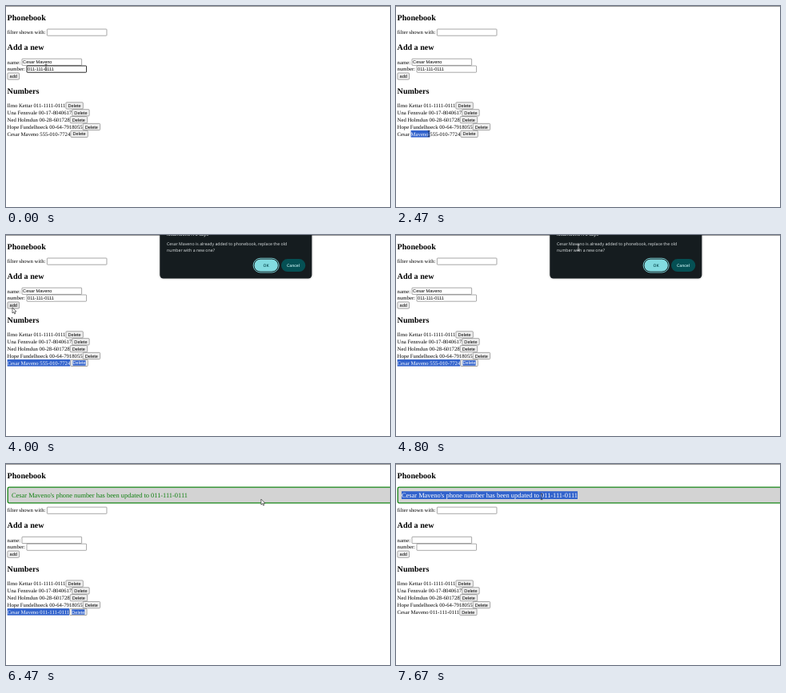
An HTML page with a canvas for the animation above (8000 ms loop, 480 by 252 pixels).

```html
<!DOCTYPE html>
<html lang="en">
<head>
<meta charset="utf-8">
<title>Phonebook</title>
<style>
  html, body { margin: 0; width: 100%; height: 100%; overflow: hidden; background: #fff; }
  canvas { display: block; width: 480px; height: 252px; }
</style>
</head>
<body>
<canvas id="stage" width="480" height="252"></canvas>
<script>
const ctx = document.getElementById('stage').getContext('2d');
const LOOP = 8000, STEP = 1000 / 15;
const SERIF = '"Liberation Serif", "Times New Roman", serif';
const SANS = '"Liberation Sans", Arial, sans-serif';
const UI = '"Open Sans", "Noto Sans", sans-serif';
const BODY = `6.72px ${SERIF}`, HEAD = `bold 10.08px ${SERIF}`, FORM = `5.6px ${SANS}`;
const BLUE = '#3263cc', ROW_H = 8.85, NOTICE_H = 25.1;

const NAME = 'Cesar Maveno', OLD = '555-010-7724', NEW = '011-111-0111';
const PEOPLE = [
  'Ilmo Kettar 011-1111-0111',
  'Una Fennvale 00-17-8040617',
  'Ned Holmdun 00-28-601728',
  'Hope Fundelhoeck 00-64-7918055'
];

// Moments when something changes at once
const AT = {
  blur: 665, word: 725, line: 2600, dialog: 3793, drag: 4865, ring: 5400,
  accept: 6265, update: 6330, clear: 6995, notice: 7525
};

// Pointer path: time, x, y, shape (I = text beam, A = arrow)
const PATH = [
  [0, 50, 77, 'I'], [70, 50, 77, 'I'], [270, 106, 122, 'A'], [470, 33, 160, 'I'],
  [870, 33, 160, 'I'], [1200, 48, 71, 'I'], [1470, 98, 79, 'I'], [1730, 78, 79, 'I'],
  [2270, 41, 160, 'I'], [2930, 41, 160, 'I'], [3330, 72, 79, 'I'], [3670, 8, 91, 'A'],
  [4130, 8, 91, 'A'], [4670, 228, 16, 'I'], [4800, 228, 16, 'I'], [4870, 213, 12, 'I'],
  [5000, 330, 12, 'I'], [5130, 251, 20, 'I'], [5330, 251, 20, 'I'], [5730, 272, 36, 'A'],
  [5870, 272, 36, 'A'], [6130, 325, 38, 'A'], [6330, 325, 38, 'A'], [6530, 317, 46, 'A'],
  [6600, 317, 46, 'A'], [6670, 205, 70, 'A'], [6930, 45, 184, 'I'], [7000, 45, 184, 'I'],
  [7330, 185, 40, 'I'], [7600, 185, 40, 'I'], [7670, 182, 41, 'I'], [LOOP, 182, 41, 'I']
];

const clamp = v => Math.max(0, Math.min(1, v));
const ease = v => v * v * (3 - 2 * v);

function pointer(t) {
  const i = Math.max(1, PATH.findIndex(p => p[0] > t));
  const a = PATH[i - 1], b = PATH[i];
  const k = ease(clamp((t - a[0]) / (b[0] - a[0])));
  return {
    x: a[1] + (b[1] - a[1]) * k,
    y: a[2] + (b[2] - a[2]) * k,
    shape: k > 0.6 ? b[3] : a[3]
  };
}

function text(str, x, y, font, color = '#000', align = 'left') {
  ctx.font = font;
  ctx.fillStyle = color;
  ctx.textAlign = align;
  ctx.fillText(str, x, y);
}

function width(str, font) {
  ctx.font = font;
  return ctx.measureText(str).width;
}

function rect(x, y, w, h, color) {
  ctx.fillStyle = color;
  ctx.fillRect(x, y, w, h);
}

function box(x, y, w, h, r, fill, stroke, line = 0.5) {
  ctx.beginPath();
  ctx.roundRect(x, y, w, h, r);
  if (fill) { ctx.fillStyle = fill; ctx.fill(); }
  if (stroke) { ctx.strokeStyle = stroke; ctx.lineWidth = line; ctx.stroke(); }
}

function field(label, y, value, focused) {
  text(label, 1.6, y, BODY);
  const x = 1.6 + width(label + ' ', BODY);
  box(x + 0.3, y - 6.3, 74.6, 8.2, 0.7, '#fff', focused ? '#101010' : '#6c6c6c', focused ? 0.9 : 0.6);
  text(value, x + 1.4, y - 0.2, FORM);
}

function button(label, x, y, { hover, selected } = {}) {
  const tw = width(label, FORM), w = tw + 5.9;
  box(x + 0.3, y - 6.4, w - 0.6, 8.3, 1.1, hover ? '#e2e2e2' : '#efefef', '#6f6f6f', 0.6);
  if (selected) rect(x + 2.9, y - 5.4, tw, 6.5, BLUE);
  text(label, x + 2.95, y - 0.2, FORM, selected ? '#fff' : '#000');
}

// sel: 'none', 'word' or 'line'
function person(entry, y, sel = 'none') {
  const w = width(entry, BODY), x = 1.6;
  text(entry, x, y, BODY);
  if (sel !== 'none') {
    const [first, last] = entry.split(' ');
    const from = sel === 'word' ? width(first + ' ', BODY) : 0;
    const to = sel === 'word' ? width(`${first} ${last} `, BODY) : w;
    const part = sel === 'word' ? last : entry;
    rect(x + from, y - 6.6, to - from, 8.6, BLUE);
    text(part, x + from, y, BODY, '#fff');
  }
  button('Delete', x + w + 0.2, y, { selected: sel === 'line' });
}

function notice(selected) {
  const msg = `${NAME}'s phone number has been updated to ${NEW}`;
  const font = `8.4px ${SERIF}`;
  box(2.2, 29.2, 500, 19.6, 1.7, '#d3d3d3', '#138313', 1.3);
  if (selected) rect(7, 34.2, width(msg, font), 9.8, BLUE);
  text(msg, 7, 41.9, font, selected ? '#fff' : '#108010');
}

function page(t, p) {
  const updated = t >= AT.update;
  const dy = updated ? NOTICE_H : 0;
  const sel = t < AT.word ? 'none' : t < AT.line ? 'word' : t < AT.clear ? 'line' : 'none';
  rect(0, 0, 480, 252, '#fff');
  rect(0, 0, 480, 0.9, '#8c8c8c');
  text('Phonebook', 1.6, 17.7, HEAD);
  if (updated) notice(t >= AT.notice);

  ctx.save();
  ctx.translate(0, dy);
  field('filter shown with:', 35.3, '');
  text('Add a new', 1.6, 54.9, HEAD);
  field('name:', 72.5, updated ? '' : NAME);
  field('number:', 81.3, updated ? '' : NEW, t < AT.blur);
  const hover = p.x > 2 && p.x < 17 && p.y > 84 && p.y < 93;
  button('add', 1.6, 90.3, { hover: hover && !updated });
  text('Numbers', 1.6, 109.8, HEAD);
  PEOPLE.forEach((entry, i) => person(entry, 127.2 + i * ROW_H, 'none'));
  person(`${NAME} ${updated ? NEW : OLD}`, 127.2 + 4 * ROW_H, sel);
  ctx.restore();
}

function dialogSelection(t, p) {
  if (t < AT.drag) return;
  const done = t >= 5130, second = done || p.y > 16;
  const end = second ? 353.5 : Math.max(212.5, p.x);
  rect(212.5, 7, end - 212.5, 8.2, '#0b5359');
  if (second) rect(201, 15.4, (done ? 251.5 : Math.min(p.x, 258)) - 201, 8, '#0b5359');
}

function pill(label, x, fill, color) {
  box(x, 30.1, 30.3, 16, 8, fill);
  text(label, x + 15.1, 39.9, `600 5px ${UI}`, color, 'center');
}

function dialog(t, p) {
  const a = clamp((t - AT.dialog) / 200) * (1 - clamp((t - AT.accept) / 130));
  if (a <= 0) return;
  ctx.save();
  ctx.globalAlpha = a;
  ctx.translate(0, -7 * (1 - a));
  ctx.shadowColor = 'rgba(0,0,0,.35)';
  ctx.shadowBlur = 2.5;
  box(192.3, -20, 190, 74.5, 4.5, '#151c1f');
  ctx.shadowColor = 'transparent';
  text('localhost:5173 says', 201, 0.7, `600 5.6px ${UI}`, '#dfe5e6');
  dialogSelection(t, p);
  const font = `5.23px ${UI}`;
  text(`${NAME} is already added to phonebook, replace the old`, 201, 12.8, font, '#e3e8e9');
  text('number with a new one?', 201, 21.3, font, '#e3e8e9');
  pill('OK', 310, '#82dbe0', '#07484d');
  pill('Cancel', 344, '#055054', '#c9f1f3');
  if (t < AT.ring) {
    box(310, 30.1, 30.3, 16, 8, null, '#151c1f', 0.9);
    box(309.1, 29.2, 32.1, 17.8, 8.9, null, '#82dbe0', 0.9);
  }
  ctx.restore();
}

function drawPointer({ x, y, shape }, dark) {
  ctx.save();
  ctx.translate(x, y);
  if (shape === 'I') {
    ctx.beginPath();
    ctx.moveTo(-1.4, -3.6); ctx.lineTo(1.4, -3.6);
    ctx.moveTo(0, -3.6); ctx.lineTo(0, 3.6);
    ctx.moveTo(-1.4, 3.6); ctx.lineTo(1.4, 3.6);
    ctx.lineWidth = 0.6;
    ctx.strokeStyle = dark ? '#fff' : '#222';
    ctx.stroke();
  } else {
    ctx.beginPath();
    ctx.moveTo(0, 0); ctx.lineTo(0, 7); ctx.lineTo(1.6, 5.5); ctx.lineTo(2.7, 8);
    ctx.lineTo(3.8, 7.5); ctx.lineTo(2.8, 5.1); ctx.lineTo(4.9, 5);
    ctx.closePath();
    ctx.fillStyle = '#fff';
    ctx.fill();
    ctx.lineWidth = 0.6;
    ctx.strokeStyle = '#111';
    ctx.stroke();
  }
  ctx.restore();
}

function draw(now) {
  const t = Math.floor((now % LOOP + 5) / STEP) * STEP;
  const p = pointer(t);
  ctx.textRendering = 'geometricPrecision';
  page(t, p);
  dialog(t, p);
  drawPointer(p, t > AT.dialog && t < AT.accept && p.x > 192 && p.y < 54);
}

const start = performance.now();
function tick() {
  draw(performance.now() - start);
  requestAnimationFrame(tick);
}
tick();
</script>
</body>
</html>
```
